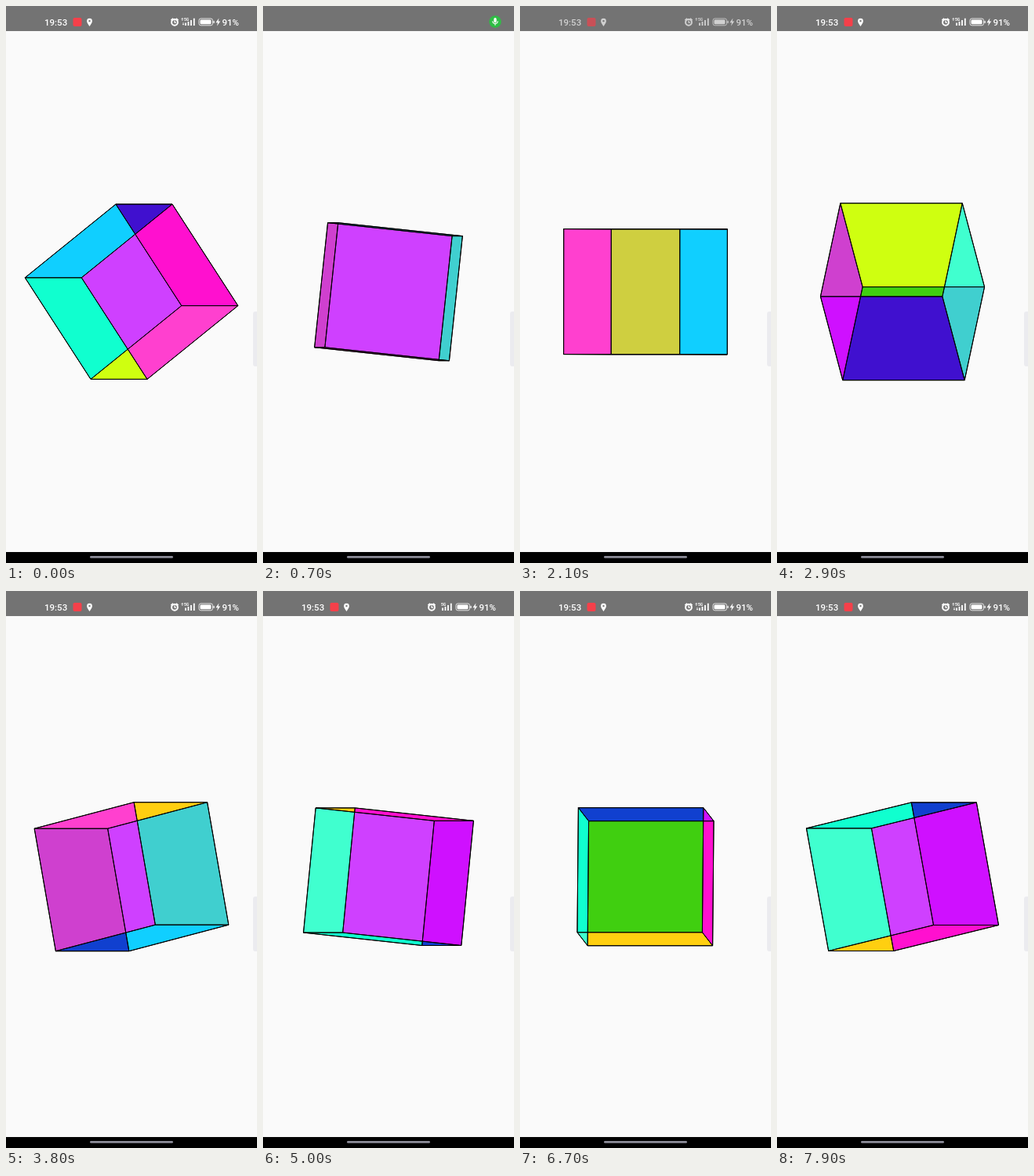
Write an HTML page that moves like this. It is 320 by 711 pixels and loops after 8 s.

```html
<!DOCTYPE html>
<html lang="en">
<head>
<meta charset="utf-8">
<title>Rotating cube</title>
<style>
  html, body { margin: 0; width: 100%; height: 100%; overflow: hidden; background: #fafafa; }
  svg { display: block; width: 100vw; height: 100vh; }
  text { font: 500 11.5px Roboto, Inter, sans-serif; fill: #fff; }
  .net { font-size: 5px; font-weight: 700; }
  .light { fill: #fff; }
  .line { fill: none; stroke: #fff; }
  #faces polygon { fill-opacity: .75; }
  #edges { fill: none; stroke: #000; stroke-linejoin: round; }
</style>
</head>
<body>
<svg viewBox="0 0 320 711" preserveAspectRatio="none">
  <rect width="320" height="711" fill="#fafafa"/>
  <rect x="315" y="390" width="8" height="70" rx="3" fill="#ebebef"/>

  <g id="faces"></g>
  <path id="edges"/>

  <rect width="320" height="32" fill="#737373"/>
  <g id="status">
    <text x="49" y="24.6">19:53</text>
    <rect x="85.5" y="15" width="11" height="11" rx="2" fill="#f5404a"/>
    <path class="light" fill-rule="evenodd" d="M106.5 26C104.6 23.2 103.1 21.2 103.1 19.2a3.4 3.4 0 0 1 6.8 0C109.9 21.2 108.4 23.2 106.5 26ZM106.5 17.9a1.2 1.2 0 1 0 .01 0Z"/>
    <!-- alarm -->
    <circle class="line" cx="215" cy="20.8" r="3.9" stroke-width="2"/>
    <path class="line" d="M210.3 18L213 15.7M219.7 18L217 15.7M215 18.6V21.2H217" stroke-width="1.3"/>
    <!-- signal -->
    <text class="net" x="227" y="18.8">5G</text>
    <path id="up" class="line" d="M224.8 19V15.6M223.7 16.8L224.8 15.5L225.9 16.8" stroke-width=".8"/>
    <path id="down" class="line" d="M226 21V24M225 23L226 24.2L227 23" stroke-width=".8"/>
    <path class="line" d="M229 25V21.5M232.5 25V20M236 25V18M239.8 25V15.8" stroke-width="1.8"/>
    <!-- battery -->
    <rect class="line" x="246" y="16" width="17.5" height="8.8" rx="2.4" stroke-opacity=".8"/>
    <rect class="light" x="247.5" y="17.5" width="14" height="5.8" rx="1.3"/>
    <rect class="light" x="264.4" y="18.8" width="1.3" height="3.2" rx=".6"/>
    <path class="light" d="M271.5 15.5L267.4 21.3H270L269 25.5L273.2 19.6H270.6Z"/>
    <text x="275.5" y="24.6">91%</text>
  </g>
  <g id="mic">
    <circle r="7.7" fill="#2fbd45"/>
    <rect x="-1.7" y="-5" width="3.4" height="6.2" rx="1.7" fill="#fff"/>
    <path d="M-3.2 -.8A3.2 3.2 0 0 0 3.2 -.8M0 2.5V4.7" fill="none" stroke="#fff" stroke-width="1.1"/>
  </g>

  <rect y="697" width="320" height="14" fill="#000"/>
  <rect x="107" y="702" width="106" height="2.8" rx="1.4" fill="#8c8c98"/>
</svg>

<script>
const LOOP = 8000, STEP = 100;
const CX = 160, CY = 364.7, HALF = 80;
const rad = Math.PI / 180;
const $ = id => document.getElementById(id);

// [axis, side, colour], in painting order
const FACES = [
  [1, 1, '#f00'], [1, -1, '#0f0'],
  [2, -1, '#00f'], [2, 1, '#ff0'],
  [0, -1, '#0ff'], [0, 1, '#f0f']
];
const polys = FACES.map(([, , fill]) => {
  const p = document.createElementNS('http://www.w3.org/2000/svg', 'polygon');
  p.setAttribute('fill', fill);
  return $('faces').appendChild(p);
});

const ramp = (t, from, to) => Math.min(1, Math.max(0, (t - from) / (to - from)));
const show = (id, amount) => $(id).setAttribute('opacity', +amount);

// Cube axes seen flat after a turn about x, then about y
function cubeAxes(t) {
  const a = (234.1 + 60 * t) * rad, b = (296.75 - 45 * t) * rad;
  return [
    [Math.cos(b), 0],
    [Math.sin(b) * Math.sin(a), Math.cos(a)],
    [Math.sin(b) * Math.cos(a), -Math.sin(a)]
  ];
}

function drawCube(t) {
  const axes = cubeAxes(t);
  let outline = '';
  FACES.forEach(([axis, side], i) => {
    const n = axes[axis], p = axes[(axis + 1) % 3], q = axes[(axis + 2) % 3];
    const pts = [[-1, -1], [1, -1], [1, 1], [-1, 1]].map(([j, k]) => [
      (CX + HALF * (side * n[0] + j * p[0] + k * q[0])).toFixed(2),
      (CY + HALF * (side * n[1] + j * p[1] + k * q[1])).toFixed(2)
    ].join());
    polys[i].setAttribute('points', pts.join(' '));
    outline += `M${pts.join('L')}Z`;
  });
  $('edges').setAttribute('d', outline);
}

function drawStatus(t) {
  show('status', 1 - ramp(t, .2, .5) + ramp(t, 1.9, 2.2));
  const mic = ramp(t, .4, .7) - ramp(t, 1.6, 1.9);
  show('mic', mic);
  $('mic').setAttribute('transform', `translate(296 20) scale(${mic})`);
  show('up', t < 4.2 || t >= 5.9);
  show('down', t < 2 || t >= 5.9);
}

function frame() {
  const t = Math.floor(performance.now() % LOOP / STEP) * STEP / 1000;
  drawCube(t);
  drawStatus(t);
  requestAnimationFrame(frame);
}
frame();
</script>
</body>
</html>
```
